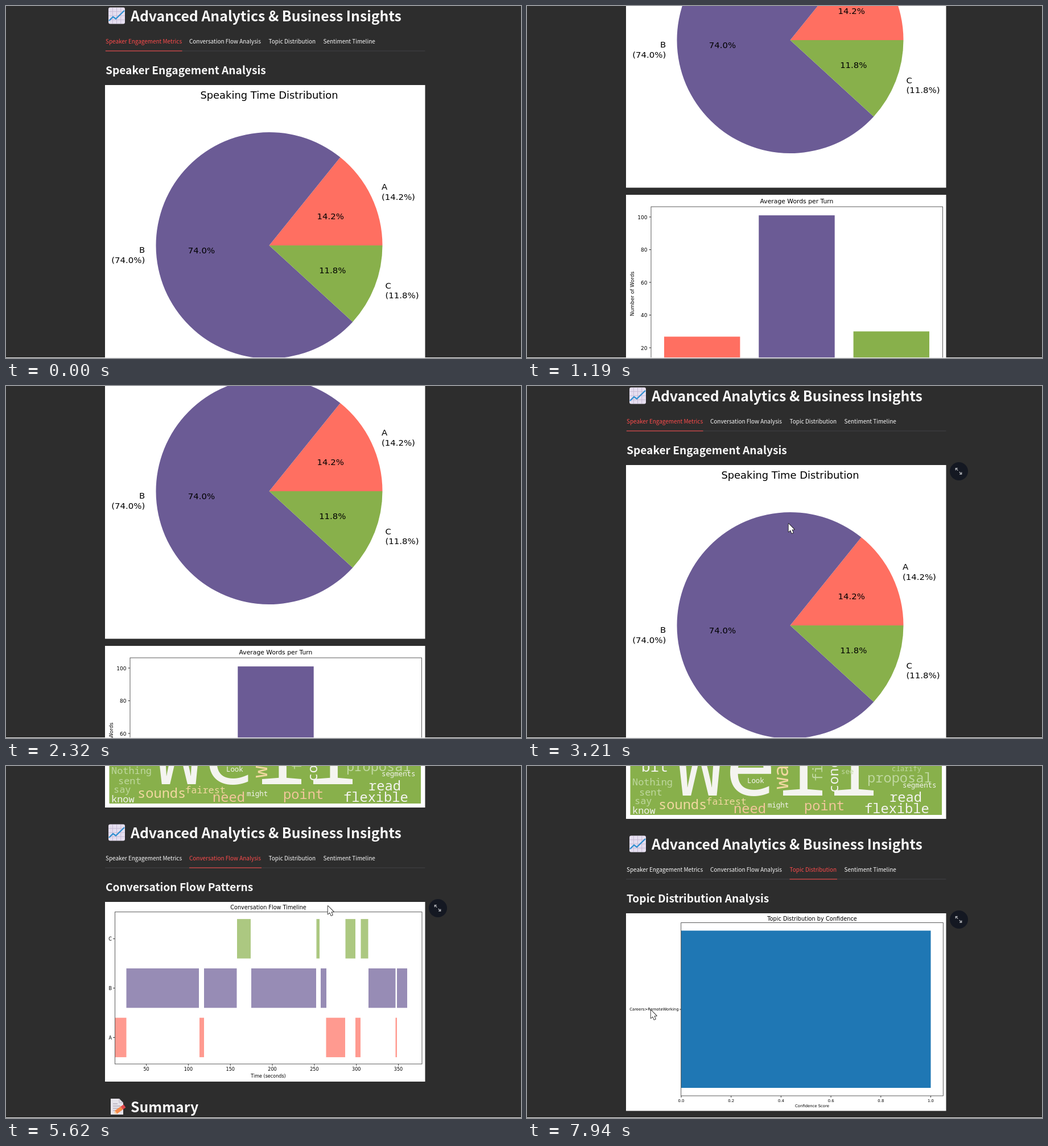
Recreate the animation shown at these times as an HTML page with a canvas. Size 905 by 619 pixels, loop 8 s.

```html
<!DOCTYPE html>
<html lang="en">
<head>
<meta charset="utf-8">
<title>Analytics dashboard</title>
<style>
html, body { margin: 0; width: 100%; height: 100%; overflow: hidden; background: #2d2d2d; }
canvas { display: block; }
</style>
</head>
<body>
<canvas id="stage" width="905" height="619"></canvas>
<script>
const ctx = document.getElementById('stage').getContext('2d');
const LOOP = 8000, NOTCH = 119.7, LEFT = 174, RIGHT = 736.5;
const UI = '"Noto Sans CJK JP", "Noto Sans CJK SC", "Noto Sans", sans-serif';
const CHART = '"DejaVu Sans", sans-serif';
const MONO = '"Noto Sans Mono", monospace';
const BG = '#2d2d2d', RED = '#ff4b4b', WHITE = '#fafafa', AXIS = '#333';
const CORAL = '#ff6f61', PURPLE = '#6b5b95', GREEN = '#88b04b';

const TABS = [
  { name: 'Speaker Engagement Metrics', x0: 175, x1: 309.5, head: 'Speaker Engagement Analysis', bottom: 1043, draw: drawSpeakers },
  { name: 'Conversation Flow Analysis', x0: 322, x1: 449, head: 'Conversation Flow Patterns', bottom: 455, draw: drawFlow },
  { name: 'Topic Distribution', x0: 461.5, x1: 545, head: 'Topic Distribution Analysis', bottom: 486, draw: drawTopics },
  { name: 'Sentiment Timeline', x0: 557.5, x1: 649 }
];

const SUMMARY = [
  "- Darvin Whelk is leading this month's meeting of the departmental managers. Speaker A introduces",
  'Darvin to the audience. - Speaker B asks everyone to get a copy of the agenda and reminds them of',
  'the presentation of online survey results. Ms. Olbey will arrive at 11:15. - Darvin asks Orin to fill them',
  'in on his progress on plans to extend flexible working hours across the company. Darvin also wants'
];

// start, end, number of picture changes
const BURSTS = [
  [130, 280, 3], [590, 750, 3], [900, 1390, 8], [1920, 2120, 4], [2260, 2460, 4],
  [2730, 3490, 11], [3550, 4300, 12], [4370, 4650, 5], [4790, 5550, 11],
  [5620, 6390, 12], [6460, 7070, 9], [7270, 7940, 10]
];

// start, end, wheel notches
const WHEEL = [
  [520, 750, 2], [850, 1110, 1], [1110, 1390, 1],
  [1855, 2120, -2], [2195, 2460, -2], [5500, 5700, -1]
];

// time, x, y of the pointer tip
const PATH = [
  [2730, 480, 604], [3180, 459, 241], [3220, 459, 241], [3490, 385, 61],
  [3850, 385, 61], [4300, 660, 235], [4650, 645, 195], [4790, 645, 195],
  [5000, 540, 190], [5110, 540, 190], [5550, 565, 245], [5780, 565, 245],
  [6390, 524, 184], [6770, 524, 184], [7070, 600, 300], [7270, 600, 300],
  [7480, 775, 290], [7940, 217, 428]
];

const clamp = v => Math.max(0, Math.min(1, v));
const ease = p => p < 0.5 ? 16 * p ** 5 : 1 - 16 * (1 - p) ** 5;

// last moment at which the picture changed
function snap(t) {
  let last = 0;
  for (const [a, b, n] of BURSTS) {
    if (t < a) break;
    const step = (b - a) / (n - 1);
    last = a + Math.min(n - 1, Math.floor((t - a) / step + 1e-6)) * step;
  }
  return last;
}

// whole pixels, so that lines and text stay sharp
const scrollAt = t => Math.round(
  WHEEL.reduce((y, [a, b, n]) => y + n * NOTCH * ease(clamp((t - a) / (b - a))), 0));

function pointerAt(t) {
  if (t >= 130 && t < 280) return t < 200 ? { x: 794, y: 373 } : { x: 829, y: 549 };
  if (t < PATH[0][0]) return null;
  let i = 0;
  while (i < PATH.length - 2 && t >= PATH[i + 1][0]) i++;
  const [ta, xa, ya] = PATH[i], [tb, xb, yb] = PATH[i + 1];
  const p = clamp((t - ta) / (tb - ta));
  return { x: xa + (xb - xa) * p, y: ya + (yb - ya) * p };
}

function text(s, x, y, font, color, align = 'left') {
  ctx.font = font;
  ctx.fillStyle = color;
  ctx.textAlign = align;
  ctx.fillText(s, x, y);
}

// chart text, centred on y
function label(s, x, y, size, align = 'center') {
  text(s, x, y + size * 0.36, `${size}px ${CHART}`, '#000', align);
}

function turned(s, x, y, size, angle) {
  ctx.save();
  ctx.translate(x, y);
  ctx.rotate(angle);
  label(s, 0, 0, size);
  ctx.restore();
}

function box(x0, y0, x1, y1, color) {
  ctx.fillStyle = color;
  ctx.fillRect(x0, y0, x1 - x0, y1 - y0);
}

function line(points, color, width = 1) {
  ctx.beginPath();
  points.forEach(([x, y]) => ctx.lineTo(x, y));
  ctx.strokeStyle = color;
  ctx.lineWidth = width;
  ctx.stroke();
}

function axes(x0, y0, x1, y1) {
  ctx.strokeStyle = AXIS;
  ctx.lineWidth = 0.8;
  ctx.strokeRect(x0, y0, x1 - x0, y1 - y0);
}

function disc(x, y, r, color) {
  ctx.beginPath();
  ctx.arc(x, y, r, 0, Math.PI * 2);
  ctx.fillStyle = color;
  ctx.fill();
}

function drawPie() {
  const cx = 462.5, cy = 421, r = 199, size = 14.9;
  label('Speaking Time Distribution', cx, 157, 17.9);
  let from = 0;
  const parts = [['A', 14.2, CORAL], ['B', 74, PURPLE], ['C', 11.8, GREEN]];
  for (const [name, share, color] of parts) {
    const to = from - share / 100 * Math.PI * 2, mid = (from + to) / 2;
    ctx.beginPath();
    ctx.moveTo(cx, cy);
    ctx.arc(cx, cy, r, from, to, true);
    ctx.fillStyle = color;
    ctx.fill();
    const pct = share.toFixed(1) + '%', c = Math.cos(mid), s = Math.sin(mid);
    const x = cx + c * r * 1.1, y = cy + s * r * 1.1, side = c > 0 ? 'left' : 'right';
    label(pct, cx + c * r * 0.6, cy + s * r * 0.6, size);
    label(name, x, y - 9, size, side);
    label(`(${pct})`, x, y + 8.7, size, side);
    from = to;
  }
}

function drawSpeakers() {
  box(LEFT, 139, RIGHT, 680.5, '#fff');
  drawPie();
  box(LEFT, 693, RIGHT, 1043, '#fff');
  const base = 1019.5, unit = 2.875;
  label('Average Words per Turn', 474, 704.5, 10.8);
  turned('Number of Words', 184.5, 867, 9, -Math.PI / 2);
  [['A', 26.8, CORAL], ['B', 101, PURPLE], ['C', 30, GREEN]].forEach(([name, v, color], i) => {
    const x = 307.7 + i * 166.3;
    box(x - 66.7, base - v * unit, x + 66.7, base, color);
    line([[x, base], [x, base + 3]], AXIS);
    turned(name, x, base + 11.5, 9, -Math.PI / 4);
  });
  for (let v = 0; v <= 100; v += 20) {
    const y = base - v * unit;
    line([[214.5, y], [218, y]], AXIS);
    label(v, 211.5, y + 0.5, 9, 'right');
  }
  axes(218, 714, 730.5, base);
}

function drawFlow() {
  box(LEFT, 139, RIGHT, 455, '#fff');
  label('Conversation Flow Timeline', 461, 148.5, 9.7);
  const rows = [
    ['C', '#acc881', [[406, 430], [545.5, 551], [596.5, 614], [623.5, 636.5]]],
    ['B', '#978cb5', [[211.5, 339], [348, 405.5], [431, 545], [553, 563], [637, 684.5], [687, 705]]],
    ['A', '#ff9a90', [[191.5, 211.5], [340, 348], [562.5, 596], [614, 623], [684.5, 687]]]
  ];
  rows.forEach(([name, color, spans], i) => {
    const y = 203.8 + i * 86.8;
    spans.forEach(([a, b]) => box(a, y - 34.7, b, y + 34.7, color));
    line([[188, y], [191.5, y]], AXIS);
    label(name, 186, y + 0.4, 8.07, 'right');
  });
  for (let v = 50; v <= 350; v += 50) {
    const x = 172.7 + v * 1.4767;
    line([[x, 424], [x, 427]], AXIS);
    label(v, x, 433.5, 8.07);
  }
  label('Time (seconds)', 461, 445, 8.07);
  axes(191.5, 156.7, 731, 424);
}

function drawTopics() {
  box(LEFT, 139, RIGHT, 486.5, '#fff');
  label('Topic Distribution by Confidence', 501, 148.3, 9.75);
  box(271, 169.5, 709.5, 446, '#1f77b4');
  line([[268, 308], [271, 308]], AXIS);
  label('Careers>RemoteWorking', 266.5, 308, 6.83, 'right');
  for (let i = 0; i <= 5; i++) {
    const x = 271 + i * 87.7;
    line([[x, 460], [x, 463]], AXIS);
    label((i / 5).toFixed(1), x, 468.2, 6.85);
  }
  label('Confidence Score', 501, 478, 6.85);
  axes(270.7, 155.6, 731.3, 460);
}

function drawCloud() {
  box(LEFT, -400, RIGHT, -27, '#fff');
  box(181.5, -393, 729, -34, GREEN);
  const pale = '#c0d8a0', sand = '#f1d8a0', peach = '#f2c69c', snow = '#f4f4f0';
  const big = 23.7, mid = 16.9, small = 12.4;
  const put = (s, x, y, size, color) => text(s, x, y, `${size}px ${MONO}`, color);
  // word, left, baseline, size, colour
  [
    ['Well', 258, -68, 150, snow], ['bit', 201, -110, 26, snow], ['Nothing', 185, -86, mid, pale],
    ['sent', 197, -68, mid, pale], ['say', 189, -53, mid, pale], ['know', 185, -36, mid, snow],
    ['sounds', 231, -44, big, sand], ['fairest', 315, -52, mid, sand], ['need', 363, -37, big, peach],
    ['Look', 387, -90, small, snow], ['might', 423, -47, small, snow], ['point', 487, -42, big, peach],
    ['see', 552, -106, small, pale], ['clarify', 641, -111, small, pale], ['proposal', 598, -91, big, pale],
    ['segments', 660, -82, small, snow], ['read', 637, -57, big, snow], ['flexible', 593, -37, big, snow]
  ].forEach(w => put(...w));
  for (const [s, x, y, size, color] of [['wait', 459, -79, 36, sand], ['find', 519, -93, 24, pale], ['concern', 547, -73, 24, snow]]) {
    ctx.save();
    ctx.translate(x, y);
    ctx.rotate(-Math.PI / 2);
    put(s, 0, 0, size, color);
    ctx.restore();
  }
}

function rounded(x, y, w, h, r, fill, stroke) {
  ctx.beginPath();
  ctx.roundRect(x, y, w, h, r);
  ctx.fillStyle = fill;
  ctx.fill();
  if (!stroke) return;
  ctx.strokeStyle = stroke;
  ctx.lineWidth = 1;
  ctx.stroke();
}

function chartIcon() {
  rounded(180, 2.5, 29, 29, 3, '#e6dff0');
  for (let i = 1; i < 4; i++) {
    const d = i * 7.25;
    line([[180 + d, 3], [180 + d, 31]], '#c6bbd6');
    line([[180.5, 2.5 + d], [208.5, 2.5 + d]], '#c6bbd6');
  }
  line([[181, 26], [188, 19], [193, 22.5], [208, 8]], '#2f8fd0', 2.2);
}

function memoIcon(y) {
  ctx.save();
  ctx.translate(183, y);
  ctx.beginPath();
  [[1, 0], [16, 0], [23, 7], [23, 28], [1, 28]].forEach(p => ctx.lineTo(...p));
  ctx.fillStyle = '#e6e3ea';
  ctx.fill();
  line([[16, 0], [16, 7], [23, 7]], '#b9b3c2');
  for (let i = 0; i < 4; i++) line([[5, 9 + i * 4], [i ? 18 : 13, 9 + i * 4]], '#aaa3b3', 1.2);
  line([[10, 24], [21, 16]], '#f58a4b', 6.5);
  line([[20.5, 16.4], [25.5, 12.8]], '#e0484f', 6.5);
  line([[8, 25.5], [10.5, 23.7]], '#f3cfa0', 4);
  ctx.restore();
}

function drawSummary(bottom) {
  memoIcon(bottom + 30);
  text('Summary', 219, bottom + 53.5, `bold 24.8px ${UI}`, WHITE);
  rounded(174.5, bottom + 73.5, 561.5, 400, 6, '#3a3a3a', '#525252');
  SUMMARY.forEach((s, i) => text(s, 188, bottom + 100.7 + i * 20.35, `500 11.4px ${UI}`, WHITE));
}

function drawTabs(active, hover, t) {
  box(LEFT, 78.5, RIGHT, 79.5, '#424246');
  TABS.forEach((tab, i) => text(tab.name, tab.x0, 66, `500 9.95px ${UI}`, i === active || i === hover ? RED : WHITE));
  const { x0, x1 } = TABS[active];
  box(active === 1 && t < 5550 ? 412 : x0, 78.5, x1, 79.5, RED);
}

function drawExpand() {
  disc(759, 150, 16, '#141822');
  for (const s of [-1, 1]) {
    const at = (dx, dy) => [758.5 + s * dx, 149.8 + s * dy];
    line([at(1.2, 1.2), at(5, 5)], '#b4b6ba', 1.3);
    line([at(5.2, 1.6), at(5.2, 5.2), at(1.6, 5.2)], '#b4b6ba', 1.3);
  }
}

function shape(d, x, y) {
  const p = new Path2D(d);
  ctx.save();
  ctx.translate(x, y);
  ctx.lineJoin = 'round';
  ctx.lineWidth = 1.6;
  ctx.strokeStyle = '#111';
  ctx.stroke(p);
  ctx.fillStyle = '#fff';
  ctx.fill(p);
  ctx.restore();
}

function drawPointer({ x, y }, hand) {
  if (hand) shape('M-2 2Q0 -1 2 2V8L9 9.5Q12 10 12 13L10.5 19.5H0.5L-5 12.5Q-5.5 10 -2 12Z', x + 1, y + 1);
  else shape('M0.6 1V15.4L4 12.4L6.3 18L8.8 17L6.5 11.4H10.8Z', x, y);
}

function draw(now) {
  const t = snap(now), scroll = scrollAt(t), pointer = pointerAt(t);
  const active = t < 3840 ? 0 : t < 6760 ? 1 : 2, tab = TABS[active];
  const pageY = pointer ? pointer.y + scroll : 0;
  const hover = pointer && pageY > 50 && pageY < 79
    ? TABS.findIndex(b => pointer.x > b.x0 && pointer.x < b.x1) : -1;
  const loading = t > 6460 && t < 7270;
  const onCard = pointer && !loading && pointer.x > LEFT && pointer.x < RIGHT
    && pageY > 139 && pageY < Math.min(tab.bottom, 680);

  box(0, 0, 905, 619, BG);
  ctx.save();
  ctx.translate(0, -scroll);
  drawCloud();
  chartIcon();
  text('Advanced Analytics & Business Insights', 219, 26.5, `bold 24.8px ${UI}`, WHITE);
  drawTabs(active, hover, t);
  text(tab.head, 175, 119.5, `bold 19.15px ${UI}`, WHITE);
  tab.draw();
  drawSummary(tab.bottom);
  if (onCard) drawExpand();
  ctx.restore();

  if ((t >= 3550 && t < 3780) || (t >= 6460 && t < 6690)) {
    disc(pointer.x, pointer.y, 15, 'rgba(195,178,20,0.8)');
  }
  if (pointer) drawPointer(pointer, hover >= 0);
  box(0, 618, 905, 619, '#f2f2f2');
}

function tick() {
  draw(performance.now() % LOOP);
  requestAnimationFrame(tick);
}
tick();
</script>
</body>
</html>
```
